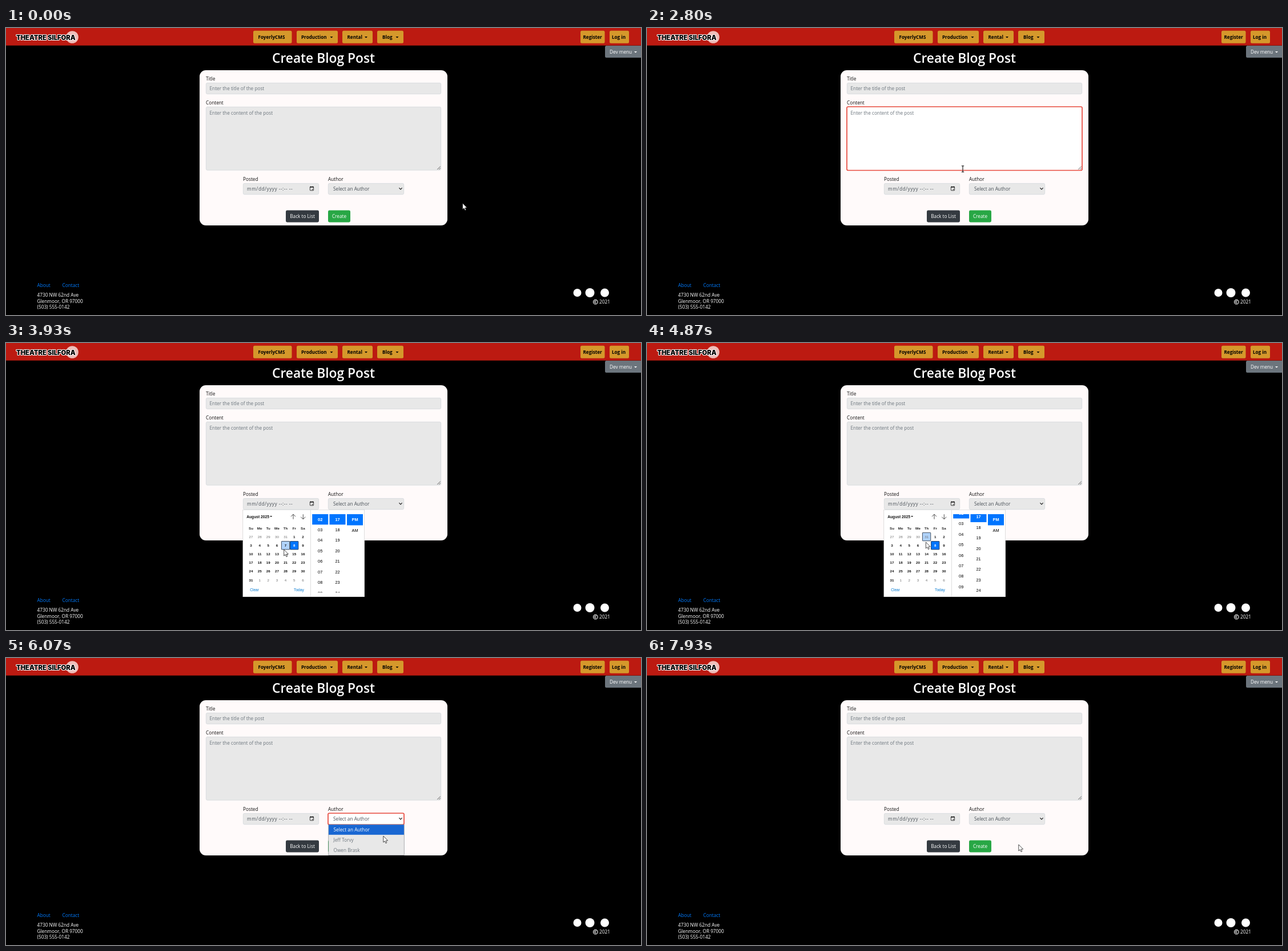
Animation, 1112 px wide and 503 px high, one loop 8 s. Source, as an HTML page with a canvas:

```html
<!DOCTYPE html>
<html lang="en">
<head>
<meta charset="utf-8">
<title>Create Blog Post</title>
<style>
html, body { margin: 0; width: 100%; height: 100%; overflow: hidden; background: #000; }
canvas { display: block; width: 1112px; height: 503px; }
</style>
</head>
<body>
<canvas id="stage"></canvas>
<script>
const W = 1112, H = 503, LOOP = 8000, FPS = 15;
const UI = '"Open Sans", "Noto Sans", sans-serif';
const ARIAL = '"Liberation Sans", Arial, sans-serif';
const RED = '#e8493d', FIELD = '#e8e8e8', MUTED = '#6c757d', BLUE = '#0075ff';

const canvas = document.getElementById('stage');
const ctx = canvas.getContext('2d');
const dpr = window.devicePixelRatio || 1;
canvas.width = W * dpr;
canvas.height = H * dpr;

const titleBox = [350, 96, 412, 20];
const contentBox = [350, 138, 412, 111.5];
const postedBox = [415, 272, 133, 20];
const authorBox = [564, 272, 133, 20];

// Pointer path: time, x, y
const path = [
  [70, 799.6, 307], [870, 505, 112], [930, 506, 113], [1670, 506, 113],
  [2330, 552, 236], [2530, 553, 243], [2800, 553, 247], [3330, 536, 279],
  [3600, 536, 280], [3850, 489, 353], [3930, 486.7, 362], [4130, 484, 367],
  [4270, 484, 367], [4400, 548, 372], [4480, 549, 372], [4560, 578, 367],
  [4630, 578, 367], [4790, 489, 341], [4870, 488.3, 349], [5050, 457, 352],
  [5250, 480, 364], [5670, 691, 284], [5800, 691, 284], [6070, 660.8, 312],
  [6530, 660, 322], [6850, 668, 304], [7000, 685, 316], [7400, 731, 324],
  [7600, 731, 324], [7930, 650.8, 327]
];

const clamp = v => Math.max(0, Math.min(1, v));
const ramp = (t, start, ms) => clamp((t - start) / ms);
const smooth = v => v * v * (3 - 2 * v);
const between = (t, a, b) => t >= a && t < b;
const inside = (x, y, [bx, by, w, h]) => x >= bx && x < bx + w && y >= by && y < by + h;

function pointerAt(t) {
  const i = path.findIndex(k => k[0] > t);
  if (i === 0) return path[0].slice(1);
  if (i < 0) return path[path.length - 1].slice(1);
  const [t0, x0, y0] = path[i - 1], [t1, x1, y1] = path[i];
  const k = smooth((t - t0) / (t1 - t0));
  return [x0 + (x1 - x0) * k, y0 + (y1 - y0) * k];
}

function text(str, x, y, color, size = 8.25, weight = 400, align = 'left', family = UI) {
  ctx.font = `${weight} ${size}px ${family}`;
  ctx.textAlign = align;
  ctx.fillStyle = color;
  ctx.fillText(str, x, y);
}

function rect(x, y, w, h, color) {
  ctx.fillStyle = color;
  ctx.fillRect(x, y, w, h);
}

function round(x, y, w, h, r, fill, stroke, width = 0.7) {
  ctx.beginPath();
  ctx.roundRect(x, y, w, h, r);
  if (fill) { ctx.fillStyle = fill; ctx.fill(); }
  if (stroke) { ctx.strokeStyle = stroke; ctx.lineWidth = width; ctx.stroke(); }
}

function circle(x, y, r, color) {
  ctx.beginPath();
  ctx.arc(x, y, r, 0, Math.PI * 2);
  ctx.fillStyle = color;
  ctx.fill();
}

function poly(points, color) {
  ctx.beginPath();
  points.forEach(([x, y]) => ctx.lineTo(x, y));
  ctx.closePath();
  ctx.fillStyle = color;
  ctx.fill();
}

function line(points, color, width) {
  ctx.beginPath();
  points.forEach(([x, y], i) => i ? ctx.lineTo(x, y) : ctx.moveTo(x, y));
  ctx.strokeStyle = color;
  ctx.lineWidth = width;
  ctx.stroke();
}

const caretDown = (x, y, w, color) => poly([[x, y], [x + w, y], [x + w / 2, y + w / 2]], color);

function field([x, y, w, h], focus) {
  round(x + 0.35, y + 0.35, w - 0.7, h - 0.7, 2.3, FIELD, '#ced4da');
  if (!focus) return;
  ctx.globalAlpha = focus;
  round(x, y, w, h, 2.3, '#fff', RED, 1.7);
  ctx.globalAlpha = 1;
}

function navButton(label, x, w, tx, caretX) {
  round(x, 4.8, w, 22, 2.5, '#d5982b');
  text(label, tx, 19, '#000', 8.15, 700);
  if (caretX) caretDown(caretX, 15, 5, '#000');
}

function drawHeader() {
  rect(0, 0, W, 30.7, '#bc1a11');
  circle(116, 16, 10.8, '#eebdb9');
  ctx.font = `900 11.2px Inter, ${UI}`;
  ctx.textAlign = 'left';
  ctx.lineJoin = 'round';
  ctx.strokeStyle = '#fff';
  ctx.lineWidth = 2.2;
  ctx.strokeText('THEATRE SILFORA', 18, 21);
  ctx.fillStyle = '#000';
  ctx.fillText('THEATRE SILFORA', 18, 21);
  ctx.lineJoin = 'miter';

  navButton('FoyerlyCMS', 433, 67.5, 441.5);
  navButton('Production', 509, 72, 517, 567.5);
  navButton('Rental', 589, 53, 597.5, 628);
  navButton('Blog', 650, 46, 659, 682.5);
  navButton('Register', 1006, 42.5, 1010.5);
  navButton('Log in', 1057, 34, 1061);

  round(1049, 31, 66, 21, 2.5, MUTED);
  text('Dev menu', 1057, 45, '#fff');
  caretDown(1100, 41, 5, '#fff');
  text('Create Blog Post', 556, 61, '#fff', 22.8, 600, 'center');
}

function drawFooter() {
  text('About', 54.5, 454, '#007bff');
  text('Contact', 98.5, 454, '#007bff');
  text('4730 NW 62nd Ave', 54.5, 470.5, '#fff');
  text('Glenmoor, OR 97000', 54.5, 481.5, '#fff');
  text('(503) 555-0142', 54.5, 492, '#fff');
  circle(1000.5, 464, 7, '#fff');
  circle(1022.5, 464, 8, '#fff');
  circle(1048.5, 464, 7.5, '#fff');
  ctx.strokeStyle = '#fff';
  ctx.lineWidth = 1.1;
  for (const [r, gap] of [[3.8, 0], [1.6, 0.7]]) {
    ctx.beginPath();
    ctx.arc(1032.3, 480.2, r, gap, Math.PI * 2 - gap);
    ctx.stroke();
  }
  text('2021', 1039, 483.2, '#fff');
}

function drawForm(t) {
  const titleFocus = ramp(t, 1290, 180) - ramp(t, 2190, 150);
  const contentFocus = ramp(t, 2190, 150) - ramp(t, 3440, 150);
  const authorFocus = ramp(t, 5740, 150) - ramp(t, 7640, 150);

  round(339, 74, 434, 272, 11, '#fffafa');
  text('Title', 350, 92, '#111');
  text('Content', 350, 134, '#111');
  text('Posted', 415, 268, '#111');
  text('Author', 564, 268, '#111');

  field(titleBox, titleFocus);
  text('Enter the title of the post', 356.5, 109.2, MUTED);
  field(contentBox, contentFocus);
  text('Enter the content of the post', 356.5, 151.5, MUTED);
  line([[755.2, 248], [760.8, 242.4]], '#444', 0.8);
  line([[758.2, 248], [760.8, 245.4]], '#444', 0.8);

  const blinkOn = start => Math.floor((t - start) / 500) % 2 === 0;
  if (between(t, 1330, 2190) && blinkOn(1330)) rect(357, 101, 0.7, 10.5, '#222');
  if (between(t, 2200, 3440) && blinkOn(2200)) rect(357, 143, 0.7, 10.5, '#222');

  field(postedBox, 0);
  ctx.letterSpacing = '0.5px';
  text('mm/dd/yyyy --:-- --', 422, 285, '#495057');
  ctx.letterSpacing = '0px';
  round(532.4, 278.4, 6.2, 6.4, 0.6, null, '#111', 0.8);
  rect(532.2, 278, 6.6, 1.5, '#111');
  rect(533.4, 277.2, 0.8, 1, '#111');
  rect(536.8, 277.2, 0.8, 1, '#111');
  rect(535.8, 282.2, 1.5, 1.4, '#111');

  field(authorBox, authorFocus);
  text('Select an Author', 573, 285, '#495057');
  line([[688.4, 280.2], [691, 282.9], [693.6, 280.2]], '#222', 1.2);

  round(490, 319.5, 58, 21, 2.4, '#343a40');
  text('Back to List', 519, 333.2, '#fff', 8.25, 400, 'center');
  round(564, 319.5, 39, 21, 2.4, '#28a745');
  text('Create', 583.5, 333.2, '#fff', 8.25, 400, 'center');
}

function timeColumn(x, first, count, last, scroll) {
  for (let i = 0; i < count; i++) {
    const y = 309 + i * 18.45 - scroll;
    const value = String((first + i - 1) % last + 1).padStart(2, '0');
    if (i === 0) rect(x - 14, y - 9, 28, 18.3, BLUE);
    text(value, x, y + 2.5, i ? '#000' : '#fff', 7.4, i ? 400 : 700, 'center', ARIAL);
  }
}

function drawPicker(t) {
  const CELL = 15.15, LEFT = 421.4, TOP = 332;
  rect(414.5, 292, 213.5, 153, '#c8c8c8');
  rect(415.1, 292.5, 212.3, 152, '#fff');
  rect(533.2, 293, 0.7, 151.5, '#d0d0d0');

  text('August 2025', 421.2, 306.8, '#111', 6.7, 700, 'left', ARIAL);
  caretDown(462, 303, 4.2, '#111');
  for (const [x, dir] of [[503, -1], [520.3, 1]]) {
    const tip = 304.5 + dir * 4.3;
    line([[x, 304.5 - dir * 4.3], [x, tip]], '#222', 0.8);
    line([[x - 4, tip - dir * 4], [x, tip], [x + 4, tip - dir * 4]], '#222', 0.8);
  }

  ['Su', 'Mo', 'Tu', 'We', 'Th', 'Fr', 'Sa'].forEach((d, i) =>
    text(d, LEFT + (i + 0.5) * CELL, 326.5, '#222', 6.2, 700, 'center', ARIAL));

  // Hover follows the pointer slightly late
  const [hx, hy] = pointerAt(t - 70);
  for (let i = 0; i < 42; i++) {
    const x = LEFT + (i % 7) * CELL, y = TOP + Math.floor(i / 7) * CELL;
    const date = new Date(2025, 6, 27 + i);
    const current = date.getMonth() === 7;
    const chosen = current && date.getDate() === 8;
    const hovered = inside(hx, hy, [x, y, CELL, CELL]);
    if (chosen || hovered)
      round(x + 0.4, y + 0.4, CELL - 0.8, CELL - 0.8, 0.5, chosen ? BLUE : '#b0d3fb', '#1c2a3c', 0.8);
    text(date.getDate(), x + CELL / 2, y + CELL / 2 + 2.3,
      chosen ? '#fff' : current ? '#111' : '#707070', 6.2, current ? 700 : 400, 'center', ARIAL);
  }
  text('Clear', 427.2, 434.7, '#0078d0', 6.6, 400, 'left', ARIAL);
  text('Today', 521.7, 434.7, '#0078d0', 6.6, 400, 'right', ARIAL);

  ctx.save();
  ctx.beginPath();
  ctx.rect(535, 300, 92, 137.5);
  ctx.clip();
  timeColumn(550.2, 2, 9, 12, 10.8 * smooth(ramp(t, 4380, 130)));
  timeColumn(580.5, 17, 9, 60, 4.3 * smooth(ramp(t, 4540, 100)));
  rect(597, 300, 28, 19.5, BLUE);
  text('PM', 611, 311.5, '#fff', 7.4, 700, 'center', ARIAL);
  text('AM', 611, 330.8, '#000', 7.4, 400, 'center', ARIAL);
  ctx.restore();
}

function drawOptions(t) {
  const active = pointerAt(t)[1] > 313 ? 1 : 0;
  rect(564.5, 291.7, 133, 54, '#767b80');
  rect(565.1, 292.2, 131.8, 53, FIELD);
  ['Select an Author', 'Jeff Torvy', 'Owen Brask'].forEach((name, i) => {
    const y = 292.2 + i * 17.6;
    if (i === active) rect(565.1, y, 131.8, 17.6, '#1967d2');
    text(name, 573.5, y + 12.1, i === active ? '#fff' : MUTED);
  });
}

function drawPointer(t) {
  const [x, y] = pointerAt(t);
  ctx.save();
  ctx.translate(x, y);
  if (inside(x, y, titleBox) || inside(x, y, contentBox)) {
    rect(-0.55, -5.5, 1.1, 11, '#111');
    rect(-2.2, -5.8, 4.4, 1, '#111');
    rect(-2.2, 4.8, 4.4, 1, '#111');
  } else {
    poly([[0, 0], [0, 11], [2.5, 8.8], [4.2, 12.7], [6, 11.9], [4.4, 8.2], [7.8, 8]], '#fff');
    ctx.strokeStyle = '#000';
    ctx.lineWidth = 0.7;
    ctx.stroke();
  }
  ctx.restore();
}

function draw(now) {
  const t = Math.floor((now % LOOP + 4) * FPS / 1000) * 1000 / FPS;
  ctx.setTransform(dpr, 0, 0, dpr, 0, 0);
  rect(0, 0, W, H, '#000');
  drawHeader();
  drawForm(t);
  drawFooter();
  if (between(t, 3590, 5760)) drawPicker(t);
  if (between(t, 5860, 7640)) drawOptions(t);
  drawPointer(t);
}

const start = performance.now();
function tick() {
  draw(performance.now() - start);
  requestAnimationFrame(tick);
}
tick();
</script>
</body>
</html>
```
